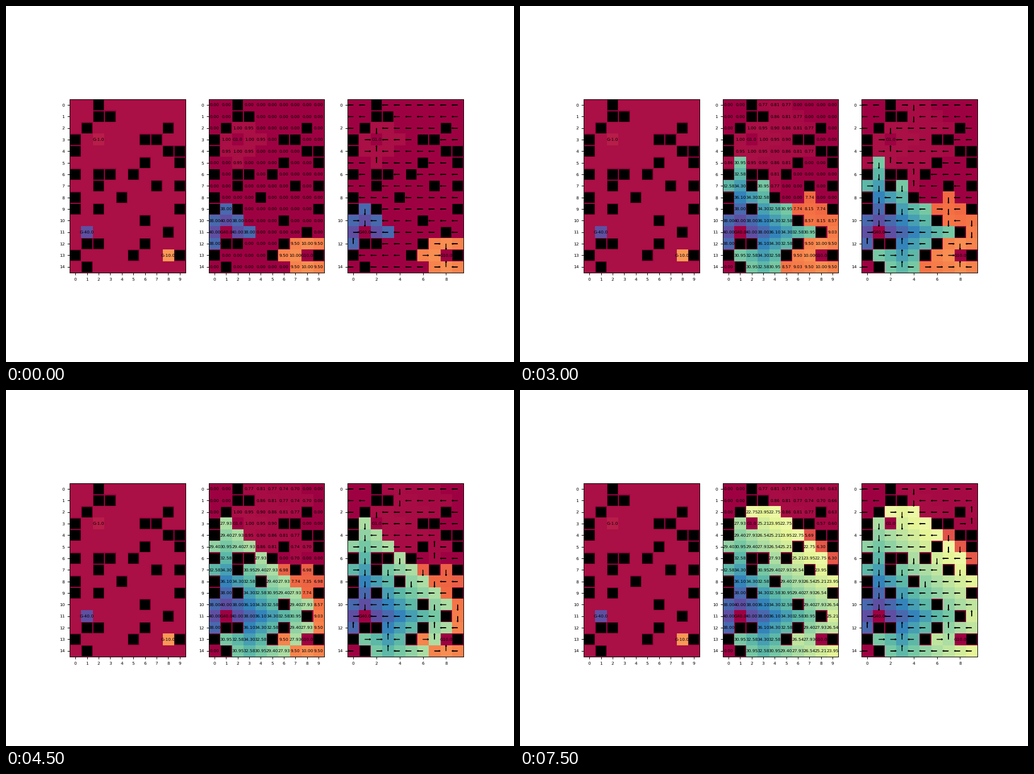
Animation of 894 by 626 pixels, one loop 8 s. Source, as a matplotlib script:

```python
import numpy as np
import matplotlib.pyplot as plt
from matplotlib.animation import FuncAnimation
from matplotlib.patches import Rectangle

W, H, DPI = 894, 626, 89.4
ROWS, COLS = 15, 10
GAMMA = 0.95
SWEEPS_PER_STEP, FRAMES_PER_STEP = 2, 3
FRAMES, INTERVAL = 16, 500

# panel edges in pixels, measured from the top left
TOP, BOTTOM = 164, 469
PANELS = [(112, 316), (357, 560), (601, 805)]

# wall columns of each row
WALLS = ["2", "23", "18", "067", "089", "69", "0235", "279",
         "04", "029", "6", "8", "126", "059", "1"]
GOALS = {(3, 2): 1.0, (11, 1): 40.0, (13, 8): 10.0}
MOVES = [(0, -1), (0, 1), (-1, 0), (1, 0)]  # left, right, up, down

walls = {(r, int(c)) for r, cols in enumerate(WALLS) for c in cols}
cells = [(r, c) for r in range(ROWS) for c in range(COLS)
         if (r, c) not in walls and (r, c) not in GOALS]


def action_value(values, cell, move):
    nxt = cell[0] + move[0], cell[1] + move[1]
    inside = 0 <= nxt[0] < ROWS and 0 <= nxt[1] < COLS
    if not inside or nxt in walls:
        nxt = cell
    return GOALS.get(nxt, 0) + GAMMA * values[nxt]


def sweep(values):
    """One synchronous value update and the greedy moves behind it."""
    new, policy = np.zeros_like(values), {}
    for cell in cells:
        q = [action_value(values, cell, m) for m in MOVES]
        best = int(np.argmax(q))
        new[cell] = q[best]
        policy[cell] = MOVES[best]
    return new, policy


def solve(sweeps):
    values, history = np.zeros((ROWS, COLS)), []
    for _ in range(sweeps):
        values, policy = sweep(values)
        history.append((values, policy))
    return history


steps = (FRAMES - 1) // FRAMES_PER_STEP + 1
history = solve(steps * SWEEPS_PER_STEP)

plt.rcParams.update({"font.family": "DejaVu Sans", "font.size": 6,
                     "xtick.labelsize": 6, "ytick.labelsize": 6,
                     "text.hinting": "none"})
# the small margin keeps the pixel size from rounding down
fig = plt.figure(figsize=((W + 0.01) / DPI, (H + 0.01) / DPI), dpi=DPI)


def add_panel(left, right):
    return fig.add_axes([left / W, 1 - BOTTOM / H,
                         (right - left) / W, (BOTTOM - TOP) / H])


reward_ax, value_ax, policy_ax = [add_panel(*edges) for edges in PANELS]


def label(ax, cell, text):
    return ax.text(cell[1], cell[0], text, ha="center", va="center")


def draw_grid(ax, data, vmin, goal_prefix, xstep, ystep):
    image = ax.imshow(data, cmap="Spectral", vmin=vmin, vmax=40,
                      aspect="auto")
    ax.set_xticks(range(0, COLS, xstep))
    ax.set_yticks(range(0, ROWS, ystep))
    for r, c in walls:
        ax.add_patch(Rectangle((c - 0.45, r - 0.45), 0.9, 0.9,
                               fc="black", lw=0, zorder=2, snap=False))
    for cell, reward in GOALS.items():
        label(ax, cell, f"{goal_prefix}{reward:.1f}")
    return image


rewards = np.zeros((ROWS, COLS))
for cell in walls:
    rewards[cell] = -1
for cell, reward in GOALS.items():
    rewards[cell] = reward

blank = np.zeros((ROWS, COLS))
draw_grid(reward_ax, rewards, -1, "G-", 1, 1)
images = [draw_grid(value_ax, blank, 0, "G", 1, 1),
          draw_grid(policy_ax, blank, 0, "G", 2, 2)]
numbers = {cell: label(value_ax, cell, "") for cell in cells}
arrows = []


def update(frame):
    step = frame // FRAMES_PER_STEP + 1
    values, policy = history[step * SWEEPS_PER_STEP - 1]
    for image in images:
        image.set_data(values)
    for cell, text in numbers.items():
        text.set_text(f"{values[cell]:.2f}")
    while arrows:
        arrows.pop().remove()
    for (r, c), (dr, dc) in policy.items():
        arrows.append(policy_ax.arrow(c, r, 0.4 * dc, 0.4 * dr,
                                      head_width=0.1, head_length=0.1,
                                      fc="black", ec="black"))
    policy_ax.set_xlim(-0.5, COLS - 0.5)
    policy_ax.set_ylim(ROWS - 0.5, -0.5)
    return []


anim = FuncAnimation(fig, update, frames=FRAMES, interval=INTERVAL,
                     repeat=True, repeat_delay=0, blit=False)
plt.show()
```
